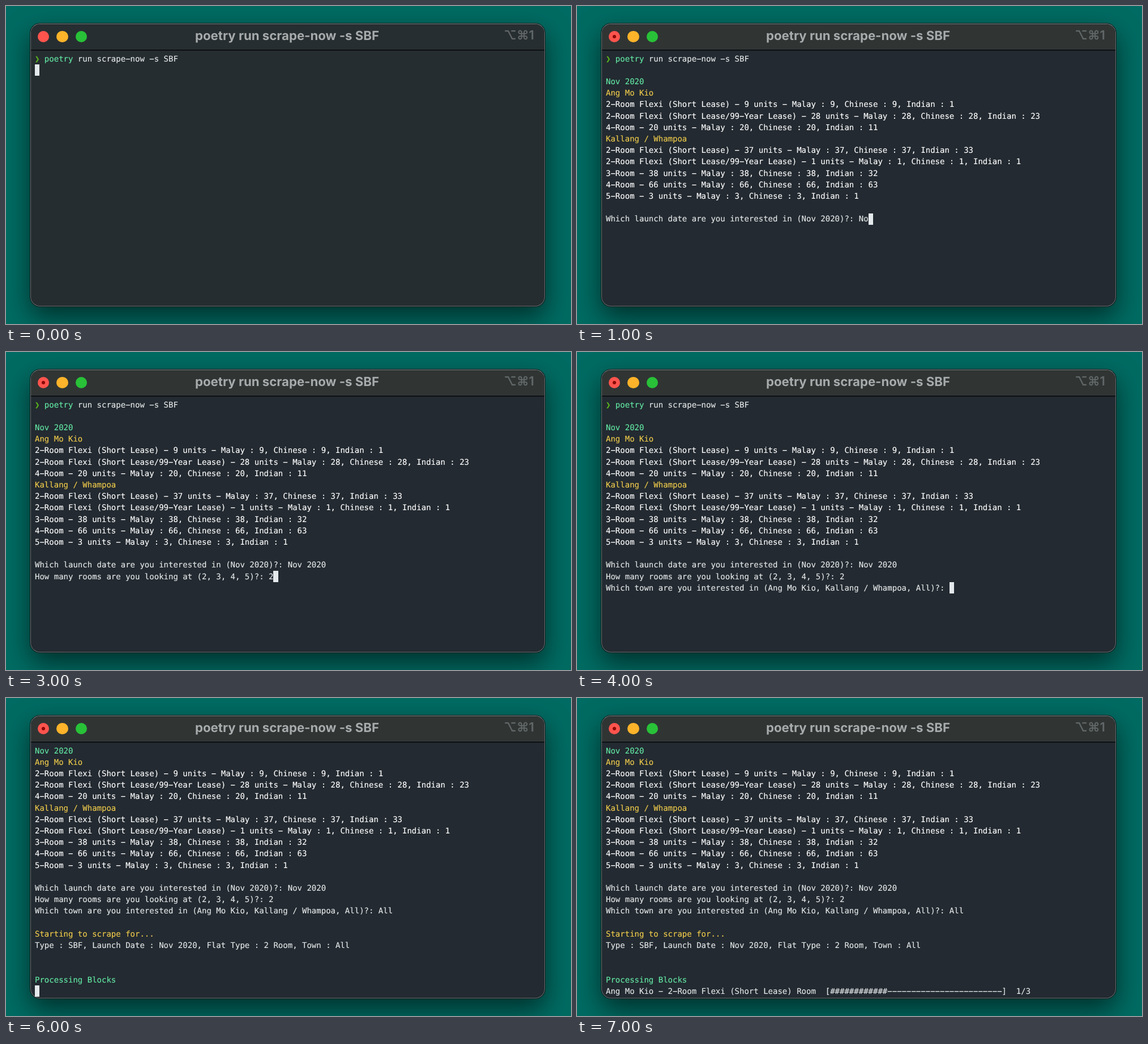
Recreate the animation shown at these times as an HTML page. Size 998 by 561 pixels, loop 8 s.

```html
<!DOCTYPE html>
<html lang="en">
<head>
<meta charset="utf-8">
<title>Terminal session</title>
<style>
  html, body { margin: 0; width: 100%; height: 100%; overflow: hidden; background: #006b62; }
  body { position: relative; text-rendering: geometricPrecision; }
  body > * { position: absolute; box-sizing: border-box; }
  #window {
    left: 43px; top: 31px; width: 909px; height: 499px; overflow: hidden;
    border: 1px solid #686e6f; border-top-color: #7c8283; border-radius: 17px;
    background: #262d31;
    box-shadow: 0 0 0 1px #071c1b, 0 18px 46px rgba(0, 0, 0, .57);
  }
  #bar { height: 46px; border-bottom: 1px solid #050708; box-shadow: 0 1px #14191c; background: #272e31; box-sizing: border-box; }
  .active #window { background: #232a31; }
  .active #bar { background: #303534; }
  .light { top: 43.5px; width: 20.6px; height: 20.6px; border-radius: 50%; }
  .active #close { background: radial-gradient(circle, #8b0905 2.7px, #ff544d 3.5px); }
  .title { font: 700 22.2px/28px Inter, sans-serif; white-space: pre; }
  #name { left: 0; top: 39px; width: 993px; text-align: center; color: #a7abac; }
  #keys { right: 65px; top: 38px; color: #626768; font-weight: 600; }
  #screen {
    left: 51px; top: 83.5px; color: #e4e8e9; white-space: pre;
    font: 14px/20.21px "DejaVu Sans Mono", monospace;
    -webkit-text-stroke: .15px;
  }
  #screen div { height: 20.21px; }
  #screen i {
    display: inline-block; width: 1ch; height: 20.21px; margin-top: -.8px;
    vertical-align: top; background: #e4e9ec;
  }
  .chevron { display: inline-block; width: 1ch; color: #5bb91d; font-weight: bold; }
  .green { color: #63e8a5; }
  .yellow { color: #efcb4c; }
  .white { color: #fff; }
</style>
</head>
<body>
<div id="window"><div id="bar"></div></div>
<div class="light" id="close" style="left:55.5px;background-color:#ff544d"></div>
<div class="light" style="left:89px;background:#fdb32a"></div>
<div class="light" style="left:122.7px;background:#28c138"></div>
<div class="title" id="name">poetry run scrape-now -s SBF</div>
<div class="title" id="keys">⌥⌘1</div>
<div id="screen"></div>
<script>
const STEP = 1000, ROWS = 22;
const cursor = '<i></i>';
const paint = (color, text) => `<span class="${color}">${text}</span>`;
const units = (room, total, indian) => paint('white',
  `${room} - ${total} units - Malay : ${total}, Chinese : ${total}, Indian : ${indian}`);

const short = '2-Room Flexi (Short Lease)';
const mixed = '2-Room Flexi (Short Lease/99-Year Lease)';
const command = paint('chevron', '❯') + ' ' + paint('green', 'poetry') + ' run scrape-now -s SBF';
const listing = [
  command, '',
  paint('green', 'Nov 2020'),
  paint('yellow', 'Ang Mo Kio'),
  units(short, 9, 1), units(mixed, 28, 23), units('4-Room', 20, 11),
  paint('yellow', 'Kallang / Whampoa'),
  units(short, 37, 33), units(mixed, 1, 1),
  units('3-Room', 38, 32), units('4-Room', 66, 63), units('5-Room', 3, 1),
  ''
];
const askDate = 'Which launch date are you interested in (Nov 2020)?: ';
const askRooms = 'How many rooms are you looking at (2, 3, 4, 5)?: ';
const askTown = 'Which town are you interested in (Ang Mo Kio, Kallang / Whampoa, All)?: ';

const dated = [...listing, askDate + 'Nov 2020'];
const sized = [...dated, askRooms + '2'];
const started = [
  ...sized, askTown + 'All', '',
  paint('yellow', 'Starting to scrape for...'),
  'Type : SBF, Launch Date : Nov 2020, Flat Type : 2 Room, Town : All', ''
];
const processing = [...started, '', paint('green', 'Processing Blocks')];
const progress = `Ang Mo Kio - ${short} Room  [${'#'.repeat(12)}${'-'.repeat(24)}]  1/3`;

const screens = [
  [command, cursor],
  [...listing, askDate + 'No' + cursor],
  [...listing, askDate + 'Nov 2020' + cursor],
  [...dated, askRooms + '2' + cursor],
  [...sized, askTown + cursor],
  [...started, cursor],
  [...processing, cursor],
  [...processing, progress]
];

const screen = document.getElementById('screen');
let shown = -1;

function draw() {
  const index = Math.floor(performance.now() / STEP) % screens.length;
  if (index !== shown) {
    shown = index;
    document.body.className = index ? 'active' : '';
    // The terminal face has wide hyphens, so they are set as minus signs.
    screen.innerHTML = screens[index].slice(-ROWS)
      .map(line => `<div>${line.replace(/-/g, '−')}</div>`).join('');
  }
  requestAnimationFrame(draw);
}
draw();
</script>
</body>
</html>
```
